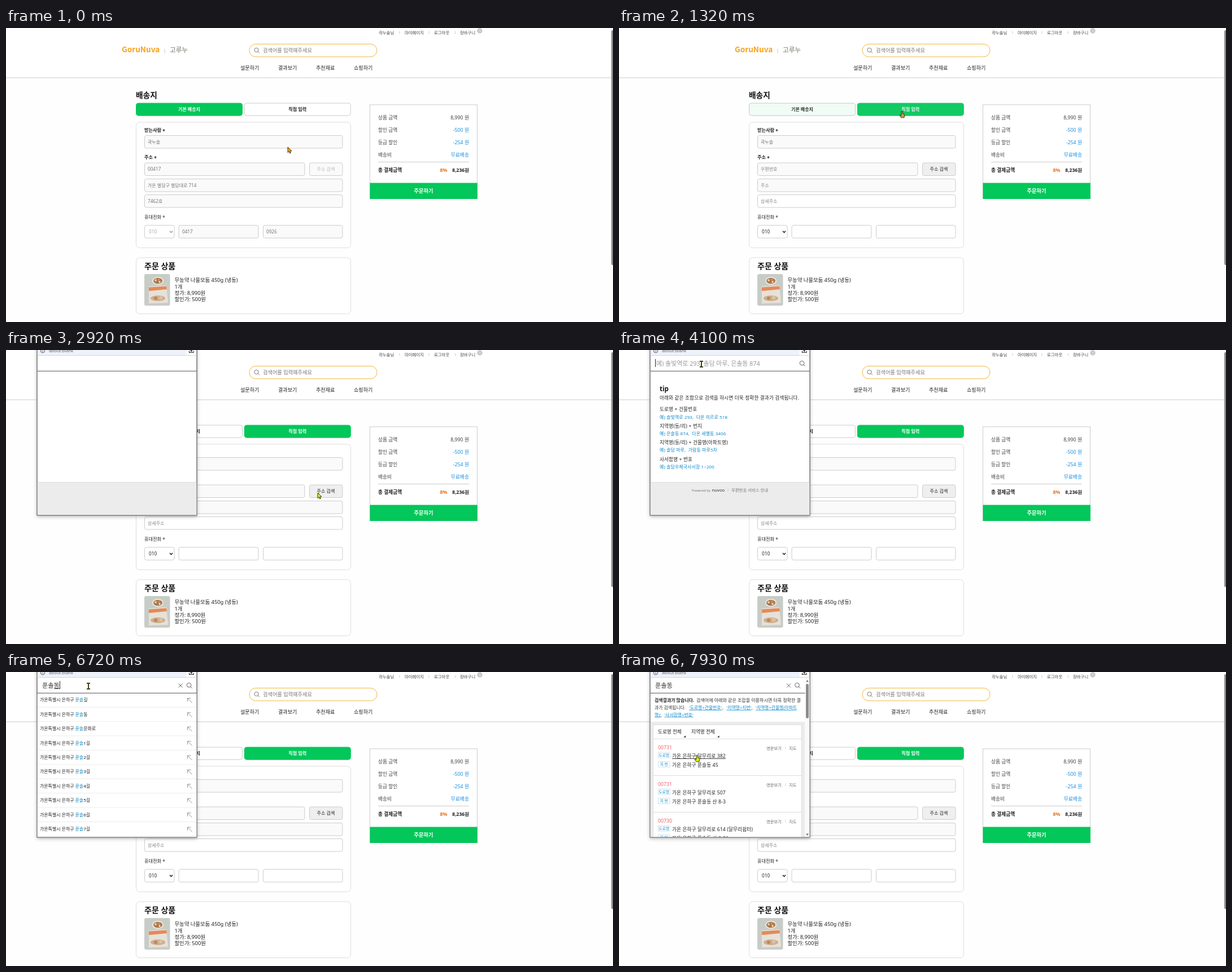
Animation, 1075 px wide and 521 px high, one loop 8 s. Source, as an HTML page:

```html
<!DOCTYPE html>
<html lang="ko">
<head>
<meta charset="utf-8">
<title>주문서</title>
<style>
html, body { margin: 0; width: 100%; height: 100%; overflow: hidden; background: #fefefe; }
svg { display: block; width: 1075px; height: 521px; }
text { font-family: 'Noto Sans', 'Noto Sans CJK KR', sans-serif; white-space: pre; }
.cjk { font-family: 'Noto Sans CJK KR', sans-serif; }
.b { font-weight: 700; }
.m { font-weight: 500; }
.l { font-weight: 300; }
.s { letter-spacing: .15px; }
.mid { text-anchor: middle; }
.end { text-anchor: end; }
.u { text-decoration: underline; }
</style>
</head>
<body>
<svg id="stage" viewBox="0 0 1075 521"></svg>
<script>
const GREEN = '#03c75a', BLUE = '#1e8fe0', LINK = '#0a86c8', INK = '#222';
const LOOP = 8000;
const TOWN = '푼솔', CITY = '가온 은하구';

const text = (x, y, size, str, fill = INK, cls = '', id = '') =>
  `<text x="${x}" y="${y}" font-size="${size}" fill="${fill}" class="${cls}" id="${id}">${str}</text>`;
const rect = (x, y, w, h, fill, stroke = 'none', r = 0, more = '') =>
  `<rect x="${x}" y="${y}" width="${w}" height="${h}" rx="${r}" fill="${fill}" stroke="${stroke}" ${more}/>`;
const path = (d, stroke, w = 1, more = '') =>
  `<path d="${d}" fill="none" stroke="${stroke}" stroke-width="${w}" ${more}/>`;
const group = (id, body, more = '') => `<g id="${id}" ${more}>${body}</g>`;
const lens = (x, y, r, color) =>
  path(`M${x - r} ${y}a${r} ${r} 0 1 0 ${2 * r} 0a${r} ${r} 0 1 0 ${-2 * r} 0M${x + r * .7} ${y + r * .7}l${r * .8} ${r * .8}`, color);
const field = (x, y, w, fill = '#fafafa', more = '') => rect(x, y, w, 22.5, fill, '#ccc', 3, more);
const label = (y, str, cls) => text(245, y, 8.2, `${str} <tspan dy="1.5">*</tspan>`, INK, cls);

function header() {
  const menu = [[660, '곽누솔님'], [706, '마이페이지'], [758, '로그아웃'], [804, '장바구니']];
  const nav = [[415, '설문하기'], [482, '결과보기'], [549, '추천재료'], [616, '쇼핑하기']];
  return rect(0, 0, 1075, 88, '#fff') +
    path('M0 88.2H1072', '#dcdcdc', 1.4) +
    menu.map(([x, s]) => text(x, 10.8, 7.4, s, '#444')).join('') +
    path('M697 5.5v5M749 5.5v5M795.5 5.5v5', '#ccc') +
    '<circle cx="839" cy="5" r="4.7" fill="#c9c9c9"/>' + text(839, 7, 5.5, '1', '#fff', 'mid') +
    text(205, 43, 13.6, 'GoruNuva', '#f9a11b', 'cjk b') +
    path('M281 36.5v8', '#ccc') + text(290, 43, 11.6, '고루누', '#a3a399', 'cjk b') +
    rect(431, 28.5, 226, 22.5, '#fff', '#f3b63f', 11.2) + lens(443.5, 39, 3.6, '#777') +
    text(455, 43, 9.2, '검색어를 입력해주세요', '#777') +
    nav.map(([x, s]) => text(x, 74.4, 9.1, s)).join('');
}

function form() {
  const saved = text(251, 253.3, 8.2, '00417', '#777') +
    text(251, 281.8, 8, '가온 별담구 별담대로 714', '#777') +
    text(251, 309.8, 8.2, '7462호', '#777') +
    text(312, 364.2, 8.2, '0417', '#777') + text(461, 364.2, 8.2, '0926', '#777');
  const blank = text(251, 253.3, 8, '우편번호', '#858585') +
    text(251, 281.8, 8, '주소', '#858585') + text(251, 309.8, 8, '상세주소', '#858585');
  return text(230, 123.6, 13.7, '배송지', '#111', 'b') +
    group('tabA', rect(230.5, 133.2, 188, 22, GREEN, GREEN, 4) + text(324.5, 147.4, 8, '기본 배송지', '#fff', 'mid b')) +
    group('tabB', rect(422.3, 133.2, 188, 22, '#fff', '#ccc', 4) + text(516.3, 147.4, 8.1, '직접 입력', INK, 'mid b')) +
    rect(230.5, 167, 380, 222.5, '#fff', '#ddd', 6) +
    label(184, '받는사람', 'b') + field(245.5, 190.5, 350.5) +
    text(251, 204.8, 8, '곽누솔', '#777') +
    label(232.4, '주소', 'b') + field(245.5, 239, 283.5) +
    field(537.5, 239, 58.5, '#fafafa', 'id="find"') + text(566.5, 253.2, 8.1, '주소 검색', '#bbb', 'mid', 'findText') +
    field(245.5, 267.5, 350.5) + field(245.5, 295.5, 350.5, '#fafafa', 'class="open"') +
    label(337.6, '휴대전화', 'm') +
    field(245.5, 349.7, 52.5, '#fff') + text(253, 364.2, 8.3, '010', '#aaa', '', 'prefix') +
    path('M290 359.8l2.5 2.6l2.5-2.6', '#999', 1.4, 'id="chevron"') +
    field(306, 349.7, 141, '#fafafa', 'class="open"') + field(455.5, 349.7, 140.5, '#fafafa', 'class="open"') +
    group('saved', saved) + group('blank', blank);
}

function product() {
  const rows = [[450.4, '무농약 나물모둠 450g (냉동)'], [461.8, '1개'], [473, '정가: 8,990원'], [484.4, '할인가: 500원']];
  return rect(230.5, 407, 380, 99.5, '#fff', '#ddd', 6) +
    text(245, 426.8, 14, '주문 상품', '#111', 'b') +
    rect(245, 436, 45.5, 56, '#c8ccc7', 'none', 3) +
    '<ellipse cx="269" cy="448" rx="10" ry="7" fill="#ece9e3"/><ellipse cx="269" cy="448" rx="8" ry="5.2" fill="#a8774f"/>' +
    '<circle cx="265" cy="447" r="2" fill="#e9c9a0"/><circle cx="271" cy="446" r="2" fill="#d98b3e"/><circle cx="272" cy="450" r="1.7" fill="#f0e2cc"/>' +
    '<path d="M253 458L284 456L287 487L253 488Z" fill="#e6e1d9"/><path d="M253 459.5L284 457.5L285 463L253 466Z" fill="#e58a55"/>' +
    '<ellipse cx="269" cy="479" rx="13" ry="5" fill="#cfae8c"/><circle cx="265" cy="479" r="3" fill="#b98a60"/><circle cx="274" cy="478" r="3" fill="#dcc3a4"/>' +
    rows.map(([y, s]) => text(298.5, y, 9.35, s)).join('');
}

function summary() {
  const rows = [['상품 금액', '8,990 원', '#444'], ['할인 금액', '-500 원', BLUE], ['등급 할인', '-254 원', BLUE], ['배송비', '무료배송', BLUE]];
  return rect(644.5, 136, 190, 166.5, '#fff', '#ccc') +
    rows.map(([a, b, c], i) => text(659, 161.8 + 22 * i, 8.7, a, '#444') + text(820, 161.8 + 22 * i, 8.8, b, c, 'end')).join('') +
    path('M659 237.5H820', '#ccc') + text(659, 255, 8.7, '총 결제금액', INK, 'b') +
    text(768.5, 255, 8.8, '8%', '#e8701f', 'b') + text(820, 255, 8.5, '8,236원', INK, 'end b') +
    rect(644.5, 274.5, 190.5, 28.5, GREEN) + text(739.5, 292.2, 9.3, '주문하기', '#fff', 'mid b');
}

function tipView() {
  const tips = [
    ['도로명 + 건물번호', '예) 솔빛역로 293,  다온 미르로 518'],
    ['지역명(동/리) + 번지', '예) 은솔동 874,  다온 새별동 3406'],
    ['지역명(동/리) + 건물명(아파트명)', '예) 솔담 마루,  가람동 마루5차'],
    ['사서함명 + 번호', '예) 솔담우체국사서함 1~200']];
  return text(72, 73, 11.6, 'tip', '#111', 'b') +
    text(72, 88, 8.6, '아래와 같은 조합으로 검색을 하시면 더욱 정확한 결과가 검색됩니다.', INK, 's') +
    tips.map(([a, b], i) => text(72, 108.3 + 29.4 * i, 8.6, a, INK, 's') + text(72, 121.6 + 29.4 * i, 7.9, b, LINK, 's')).join('') +
    text(129, 250.8, 6, 'Powered by', '#777') + text(164.5, 251.3, 7.7, 'nuvoo', '#333', 'm') +
    path('M193 245v6', '#d0d0d0') + text(199, 251, 7.4, '우편번호 서비스 안내', '#777', 'l');
}

function suggestView() {
  const ends = ['길', '동', '문화로', '1길', '2길', '3길', '4길', '5길', '6길', '7길'];
  return rect(55.5, 38, 282.5, 254.5, '#fff') + ends.map((s, i) => {
    const y = 49.5 + 25.4 * i;
    return text(60, y + 2.8, 7.95, `가온특별시 은하구 <tspan fill="${LINK}">${TOWN}</tspan>${s}`) +
      path(`M321.5 ${y + 3}v-6h6M321.5 ${y - 3}l8 8`, '#888', .9) +
      path(`M56 ${y + 12.8}H338`, '#ececec');
  }).join('');
}

function resultView() {
  const rows = [
    ['00731', '달무리로 382', '동 45'],
    ['00731', '달무리로 507', '동 산 8-3'],
    ['00730', '달무리로 614 (달무리쉼터)', '동 산 8-31']];
  const tag = (y, s) => rect(69.5, y, 20.5, 10, '#fff', '#cfe3ee') + text(79.7, y + 7.6, 6.6, s, LINK, 'mid');
  const links = [[124, 66, "'도로명+건물번호'"], [190.5, 66, "'지역명+지번'"], [242, 66, "'지역명+건물명(아파트"], [63, 78.5, "명)'"], [80.5, 78.5, "'사서함명+번호'"]];
  return rect(55.5, 38, 274, 254.5, '#fff') + rect(55.5, 88, 274, 204.5, '#ececec') +
    text(63, 53.3, 7.95, '검색결과가 많습니다.', INK, 'b') +
    text(137, 53.3, 8.05, '검색어에 아래와 같은 조합을 이용하시면 더욱 정확한 결', '#333') +
    text(63, 66, 7.9, '과가 검색됩니다.', '#333') +
    links.map(([x, y, s]) => text(x, y, 7.8, s, LINK, 'u')).join('') +
    text(183, 66, 7.8, ',') + text(234.5, 66, 7.8, ',') + text(73.5, 78.5, 7.8, ',') +
    rect(60.5, 93.5, 263, 204, '#fff', '#ddd') + path('M60 118.5H324', '#ddd') +
    text(69, 109.3, 8.6, '도로명 전체') + text(128, 109.3, 8.6, '지역명 전체') +
    '<path d="M118 112.5v3.5h-3.5zM177.5 112.5v3.5h-3.5z" fill="#222"/>' +
    rows.map(([zip, road, lot], i) => group('', text(69, 137.2, 8.75, zip, '#f0606b') +
      text(261, 138, 7.3, '영문보기', '#666') + path('M294.5 131.5v6', '#ddd') + text(301, 138, 7.3, '지도', '#666') +
      tag(142.2, '도로명') + text(94, 152.2, 8.6, `${CITY} ${road}`, INK, 's', i ? '' : 'pick') +
      tag(158.5, '지 번') + text(94, 168.4, 8.6, `${CITY} ${TOWN}${lot}`, INK, 's') +
      path('M60 183.5H324', '#ddd'), `transform="translate(0 ${65 * i})"`)).join('') +
    rect(329.5, 10, 8.5, 282.5, '#fafafa') + rect(331, 21, 5, 61, '#8b8b8b', 'none', 2.5) +
    '<path d="M331 17.5h5l-2.5-3.5zM331 286.5h5l-2.5 3.5z" fill="#777"/>';
}

function popup() {
  const frame = rect(55, -20, 283, 313, '#fff', '#777', 0, 'style="filter:drop-shadow(0 2px 3px #0004)"') +
    rect(55.5, 0, 264, 9.5, '#edf2fb') + path('M55 9.7H338', '#cfd3da') +
    '<circle cx="65" cy="1.3" r="3.6" fill="none" stroke="#555"/>' + path('M65 .8v2.2', '#555') +
    text(76, 4.2, 7.7, 'about:blank', '#666');
  const body = path('M324.5 1.5v3h7.5v-3M328.2 -2v4.5M326.5 .8l1.7 1.7l1.7-1.7', '#222', 1.1) +
    rect(55.5, 234.5, 282.5, 58, '#ececec') + path('M55.5 234.5H338', '#ddd') +
    path('M55.5 37.4H338', '#555');
  const bar = text(66, 27.6, 10.9, '예) 솔빛역로 293, 솔담 마루, 은솔동 874', '#999', 'l', 'hint') +
    text(64, 27.6, 11.2, '', '#333', '', 'query') + path('', '#333', 1, 'id="compose"') + path('', '#222', 1, 'id="caret"') +
    group('icons', path('M305.5 20.5l7 7M312.5 20.5l-7 7', '#666', 1, 'id="clear"') + lens(324, 23.2, 3.8, '#666'));
  return frame + group('body', body) +
    group('views', group('tip', tipView()) + group('suggest', suggestView()) + group('result', resultView()) + bar, 'clip-path="url(#inner)"') +
    path('M55 0V293H338V0', '#777');
}

const cursor = group('arrow', '<path d="M0 0V9.6L2.2 7.6L3.8 11L5.4 10.3L3.9 7H6.9Z" stroke="#222" stroke-width=".9"/>') +
  group('hand', '<path d="M-1.2 1Q0-.4 1.2 1V4.8L4 5.6Q5 6 4.8 8L4 11.8H-1.4L-4 8Q-3.7 6.8-2.5 7.4L-1.2 8.4Z" stroke="#222" stroke-width=".9"/>') +
  group('beam', path('M-3-5H3M0-5V5M-3 5H3', '#3f3f12', 2));

document.getElementById('stage').innerHTML =
  '<clipPath id="inner"><rect x="55" y="0" width="283" height="292.5"/></clipPath>' +
  rect(0, 0, 1075, 521, '#fefefe') + header() + form() + product() + summary() +
  rect(1072, 0, 3, 521, '#fafafa') + rect(1072, 4, 5, 416, '#8a8a8a', 'none', 2) +
  group('popup', popup()) + group('cursor', cursor);

const $ = id => document.getElementById(id);
const show = (id, on) => $(id).style.display = on ? '' : 'none';
const at = (steps, t) => steps.reduce((v, s) => t >= s[0] ? s[1] : v, steps[0][1]);
const hex = c => c.slice(1).match(/../g).map(h => parseInt(h, 16));
const mix = (a, b, p) => { const q = hex(b); return `rgb(${hex(a).map((v, i) => Math.round(v + (q[i] - v) * p))})`; };

// start, end, steps, target x, target y
const moves = [
  [100, 600, 6, 501, 147], [1600, 2010, 5, 552, 241], [2190, 2290, 2, 552, 253],
  [3230, 3710, 6, 146, 25], [4300, 4300, 1, 149, 26], [4400, 4400, 1, 146, 25],
  [7430, 7730, 4, 136, 152], [7930, 7930, 1, 138, 147]];
const tabSteps = [[0, 0], [1000, .12], [1100, .45], [1200, .76], [1320, .94], [1400, 1]];
const hoverSteps = [[0, 0], [500, .5], [600, 1]];
const fade = [[0, 0], [2600, .08], [2700, .3], [2800, .8], [2920, 1]];
const zoom = [[0, .92], [2700, .963], [2800, .99], [2920, 1]];
const carets = [[0, 0], [3020, 1], [3610, 0], [4100, 1], [4300, 0], [4400, 1], [4900, 0], [5310, 1], [5820, 0], [6020, 1], [6920, 0]];
const typed = [[0, ''], [5310, 'ㅍ'], [6020, '푸'], [6120, '푼'], [6220, '푼ㅅ'], [6320, '푼소'], [6420, '푼솔'], [6520, '푼솔ㄷ'], [6620, '푼솔도'], [6720, '푼솔동']];
const tints = [[0, '#f7a81b'], [1000, '#b9a634'], [1600, '#dcec1c']];

function pointer(t) {
  let x = 499, y = 211;
  for (const [t0, t1, n, tx, ty] of moves) {
    if (t < t0) break;
    const gap = (t1 - t0) / (n - 1 || 1) || 1;
    const k = Math.min(1, (Math.floor((t - t0) / gap + .01) + 1) / n);
    const p = k * k * (3 - 2 * k);
    x += (tx - x) * p;
    y += (ty - y) * p;
  }
  return [x, y];
}

function paintTab(id, bg, line, ink) {
  const [box, name] = $(id).children;
  box.setAttribute('fill', bg);
  box.setAttribute('stroke', line);
  name.setAttribute('fill', ink);
}

function render(t) {
  const p = at(tabSteps, t), manual = t >= 1000;
  paintTab('tabA', mix(GREEN, '#ffffff', p), mix(GREEN, '#cccccc', p), mix('#ffffff', '#222222', p));
  const hover = mix('#ffffff', '#effaf4', at(hoverSteps, t));
  paintTab('tabB', manual ? mix('#effaf4', GREEN, p) : hover, mix('#cccccc', GREEN, p), mix('#222222', '#ffffff', p));
  show('saved', !manual);
  show('blank', manual);
  document.querySelectorAll('.open').forEach(e => e.setAttribute('fill', manual ? '#fff' : '#fafafa'));
  $('find').setAttribute('fill', manual ? '#efefef' : '#fafafa');
  $('findText').setAttribute('fill', manual ? INK : '#bbb');
  $('prefix').setAttribute('fill', manual ? INK : '#aaa');
  $('chevron').setAttribute('stroke', manual ? '#111' : '#999');

  const s = at(zoom, t), done = t >= 7030;
  show('popup', t >= 2600);
  $('popup').setAttribute('opacity', at(fade, t));
  $('popup').setAttribute('transform', `translate(${196 * (1 - s)} ${110 * (1 - s)}) scale(${s})`);
  show('body', t >= 2920);
  show('views', t >= 3020);
  show('tip', t < 6620);
  show('suggest', t >= 6620 && !done);
  show('result', done);

  const word = at(typed, t), n = word.length, end = 64.5 + 10.3 * n;
  show('hint', !n);
  $('query').textContent = word;
  $('compose').setAttribute('d', n && t < 6920 ? `M${end - 10.3} 29.5H${end - .5}` : '');
  $('caret').setAttribute('d', at(carets, t) ? `M${end} 16V30` : '');
  show('clear', t >= 5520);
  $('icons').setAttribute('transform', `translate(${done ? -8.5 : 0} 0)`);

  const [x, y] = pointer(t);
  const beam = t >= 3230 && t < 7030 && x < 338 && y < 37;
  const hand = t < 2010 ? y < 155 && y > 133 : t >= 7730;
  show('beam', beam);
  show('hand', hand);
  show('arrow', !beam && !hand);
  $('cursor').setAttribute('transform', `translate(${x} ${y})`);
  $('cursor').setAttribute('fill', at(tints, t));
  $('pick').setAttribute('class', t >= 7730 ? 's u' : 's');
}

const begin = performance.now();
function tick() {
  render((performance.now() - begin) % LOOP);
  requestAnimationFrame(tick);
}
tick();
</script>
</body>
</html>
```
